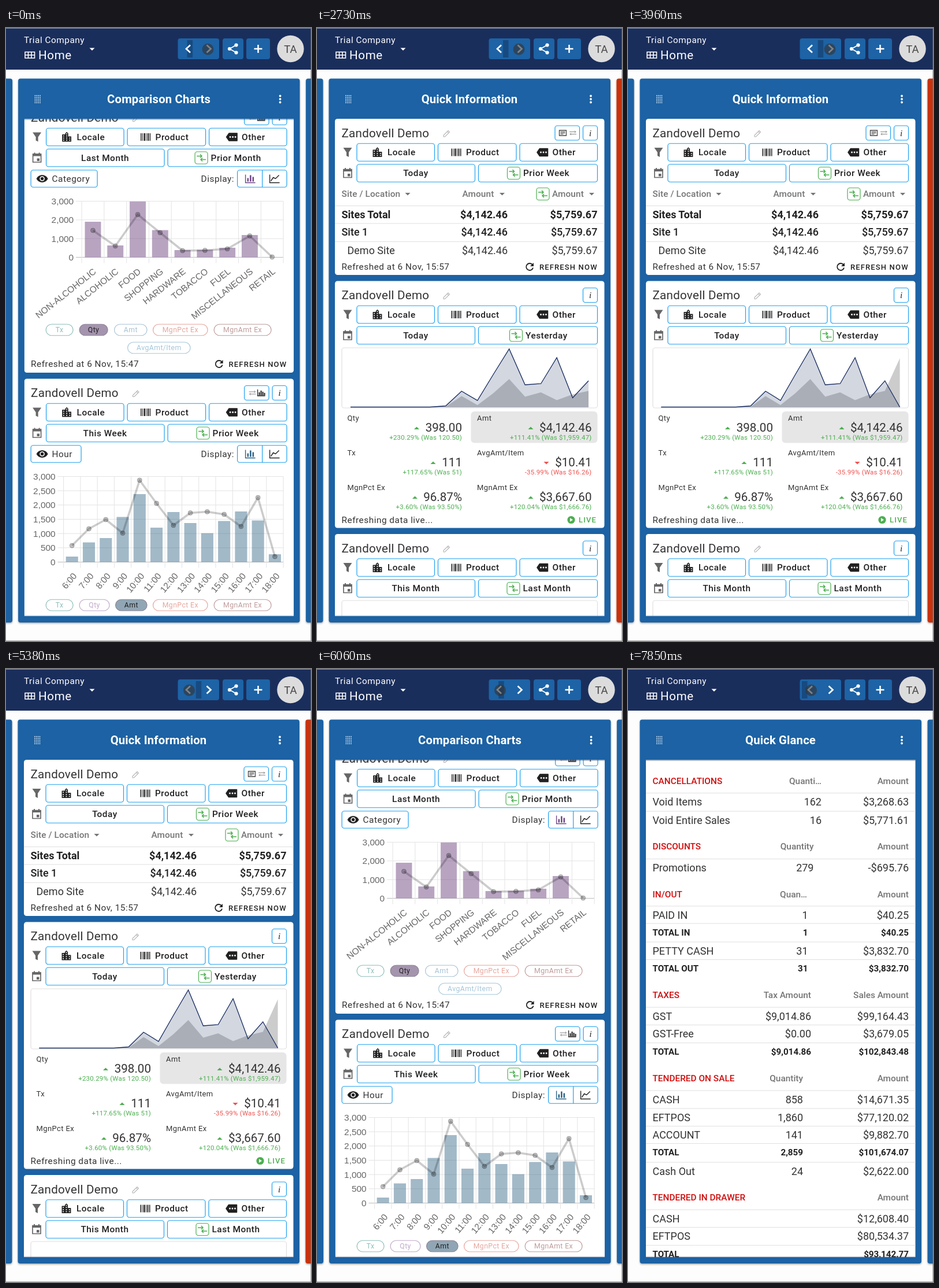
An HTML page that plays this animation: 528 px wide and 1060 px high, repeating every 8 s.

```html
<!DOCTYPE html>
<html lang="en">
<head>
<meta charset="utf-8">
<title>Dashboard</title>
<style>
  html, body { margin: 0; width: 100%; height: 100%; overflow: hidden; background: #fdfdfd; }
  svg { display: block; width: 100vw; height: 100vh; }
  text { font-family: Roboto, sans-serif; white-space: pre; }
  .axis text { font-family: "Liberation Sans", Arial, sans-serif; }
</style>
</head>
<body>
<svg id="stage" viewBox="0 0 528 1060"></svg>
<script>
const BLUE = '#1c62a4', INK = '#212121', GREY = '#757575', GREEN = '#4caf50', EDGE = '#1da1ee';

// Drawing helpers; the y of a text is the middle of its capitals.
const text = (x, y, s, { size = 15.4, ls = 0, w = 400, fill = INK, a = 'start', extra = '' } = {}) =>
  `<text x="${x}" y="${y + size * .355}" font-size="${size}" letter-spacing="${ls}" font-weight="${w}" fill="${fill}" text-anchor="${a}" ${extra}>${s}</text>`;
const rect = (x, y, w, h, fill, r = 0, extra = '') =>
  `<rect x="${x}" y="${y}" width="${w}" height="${h}" rx="${r}" fill="${fill}" ${extra}/>`;
const path = (d, fill = 'none', stroke = 'none', width = 1, extra = '') =>
  `<path d="${d}" fill="${fill}" stroke="${stroke}" stroke-width="${width}" ${extra}/>`;
const circle = (x, y, r, fill, extra = '') => `<circle cx="${x}" cy="${y}" r="${r}" fill="${fill}" ${extra}/>`;
const at = (x, y, body, more = '') => `<g transform="translate(${x} ${y}) ${more}">${body}</g>`;
const box = (x1, x2, y, h, stroke = EDGE, fill = '#fff', r = 4) =>
  rect(x1, y - h / 2, x2 - x1, h, fill, r, `stroke="${stroke}" stroke-width="1.2"`);
const rule = y => rect(31, y, 466.5, 1, '#e0e0e0');
const caret = (x, y, fill = GREY, dir = 1) => path(`M${x - 4.5} ${y - 2 * dir}h9l-4.5 ${4.5 * dir}z`, fill);
const label = { ls: .5, w: 500 };

const icons = {
  funnel: path('M-7.5-8H7.5L2 0V8L-2 6V0Z', '#666'),
  calendar: path('M-7-6.5H7V7.5H-7Z', 'none', '#666', 1.7) + path('M-7.5-7H7.5V-3H-7.5ZM-5-9h2v3h-2zM3-9h2v3h-2zM0 1h4.5v4.5H0z', '#666'),
  building: at(0, 0, path('M15 11V5l-3-3-3 3v2H3v14h18V11h-6zm-8 8H5v-2h2v2zm0-4H5v-2h2v2zm0-4H5V9h2v2zm6 8h-2v-2h2v2zm0-4h-2v-2h2v2zm0-4h-2V9h2v2zm0-4h-2V5h2v2zm6 12h-2v-2h2v2zm0-4h-2v-2h2v2z', INK), 'scale(.88) translate(-12 -12)'),
  barcode: path('M-8.5-6.5h1.5v13h-1.5zM-5.5-6.5h1v13h-1zM-3-6.5h2.5v13h-2.5zM1-6.5h1v13h-1zM3.5-6.5h2v13h-2zM7-6.5h1.5v13h-1.5z', INK),
  tag: path('M-9.5 0L-5-6.5H9V6.5H-5Z', INK, INK, 1.5, 'stroke-linejoin="round"') + [-3, 1.5, 6].map(x => circle(x, 0, 1.4, '#fff')).join(''),
  eye: path('M-10 0C-6-8.5 6-8.5 10 0C6 8.5-6 8.5-10 0Z', INK) + circle(0, 0, 4.3, '#fff') + circle(0, 0, 2.7, INK),
  pencil: path('M-5.5 5.5V3L2.5-5L5-2.5L-3 5.5ZM.8-3.3L3.3-.8', 'none', '#b4b4b4', 1.1),
  compare: box(-11, 11, 0, 21, GREEN) + path('M-8-3H1M-2-6L1-3L-2 0M8 3H-1M2 0L-1 3L2 6', 'none', GREEN, 1.5),
  refresh: path('M5-3.6A6 6 0 1 0 6 1.5', 'none', INK, 1.8) + path('M7-7V-1H1Z', INK),
  swap: path('M-6-2H5M3-4L5-2L3 0M6 2H-5M-3 0L-5 2L-3 4', 'none', '#888', 1),
  minibars: path('M-6-6V5H7', 'none', INK, 1.3) + path('M-4-1h2v5h-2zM-1-4h2v8h-2zM2-2h2v6h-2zM5 0h2v4h-2z', INK),
  article: path('M-6-4.5H6V4.5H-6Z', 'none', '#444', 1.3) + path('M-4-2H4M-4 0H4M-4 2H1', 'none', '#444', 1),
  trend: path('M-8-7V7H9', 'none', INK, 1.4) + path('M-6 4L-2-2L2 0L8-6', 'none', INK, 1.4)
};
const icon = (name, x, y) => at(x, y, icons[name]);

function cardHead(y, period, periodX, versus, versusX, corner) {
  let out = text(42.5, y, 'Zandovell Demo', { size: 20.6, ls: .25, fill: '#333' }) + icon('pencil', 224.5, y + 1) +
    box(460.5, 485.5, y, 25) +
    text(473, y, 'i', { size: 15, a: 'middle', extra: 'font-style="italic" style="font-family:Liberation Serif,serif"' });
  if (corner) out += box(412, 454.5, y, 25) + (corner === 'bars'
    ? icon('swap', 426, y) + icon('minibars', 441, y) : icon('article', 425.5, y) + icon('swap', 443, y));
  const f = y + 33.5, d = y + 69.5;
  out += icon('funnel', 53, f) + icon('calendar', 53, d);
  [[69, 203.5, 'building', 104.5, 'Locale', 122], [209.5, 345, 'barcode', 241, 'Product', 258], [351, 485.5, 'tag', 390.5, 'Other', 407.5]]
    .forEach(([x1, x2, name, ix, s, tx]) => out += box(x1, x2, f, 30.5) + icon(name, ix, f) + text(tx, f, s, label));
  return out + box(69, 273.5, d, 30.5) + text(periodX, d, period, { ...label, a: 'middle' }) +
    box(279.5, 485.5, d, 30.5) + icon('compare', versusX, d) + text(versusX + 16.5, d, versus, label);
}

const cardBack = (y1, y2) => rect(31, y1, 466.5, y2 - y1, '#fff', 4.5);
const refreshed = (y, time) => text(42.5, y, `Refreshed at 6 Nov, ${time}`, { ls: .5, fill: '#333' }) +
  icon('refresh', 368, y) + text(385, y, 'REFRESH NOW', { size: 13, ls: 1.15, w: 500 });

function displayRow(y, name, right, color) {
  return box(42.5, right, y, 29.5) + icon('eye', 62, y) + text(79, y, name, { ls: .5, fill: '#333' }) +
    text(337, y, 'Display:', { ls: .5, fill: '#333' }) + box(400, 485.5, y, 29.5) + rect(442.5, y - 14.5, 1.2, 29, EDGE) +
    path(`M414 ${y - 7}V${y + 7}H431`, 'none', color, 1.4) +
    path(`M417 ${y - 1}h2.5v6h-2.5zM421.5 ${y - 6}h2.5v11h-2.5zM426 ${y - 3}h2.5v8h-2.5z`, color) + icon('trend', 464, y);
}

function barChart({ left, top, bottom, ticks, names, bars, line, color, angle, dx, dy }) {
  const right = 479.5, step = (right - left) / names.length, mid = i => left + step * (i + .5);
  let out = '';
  ticks.forEach((s, i) => {
    const y = top + (bottom - top) * i / (ticks.length - 1);
    out += rect(left - 10, y - .5, right - left + 10, 1, i === ticks.length - 1 ? '#bbb' : '#e3e3e3') +
      text(left - 14, y, s, { fill: '#666', a: 'end' });
  });
  for (let i = 0; i <= names.length; i++) out += rect(left + step * i - .5, top, 1, bottom - top + 10, '#e3e3e3');
  names.forEach((s, i) => {
    const h = bottom - bars[i];
    out += rect(mid(i) - step * .36, bars[i], step * .72, h, color) +
      at(mid(i) + dx, bottom + dy, text(0, -5.5, s, { fill: '#666', a: 'end' }), `rotate(${-angle})`);
  });
  out += path('M' + line.map((y, i) => `${mid(i)} ${y}`).join('L'), 'none', 'rgba(0,0,0,.2)', 3.6, 'stroke-linejoin="round"');
  line.forEach((y, i) => out += circle(mid(i), y, 4, 'rgba(0,0,0,.24)', 'stroke="rgba(0,0,0,.24)"'));
  return `<g class="axis">${out}</g>`;
}

const chip = (x1, x2, y, s, color, fill) => box(x1, x2, y, 19.5, fill ? '#8b8496' : color, fill || '#fff', 10) +
  text((x1 + x2) / 2, y, s, { size: 12.3, ls: .4, a: 'middle', fill: fill ? INK : color });
const chips = (y, active, fill, qtyEnd, amtStart) => [
  [68.5, 115.5, 'Tx', '#8fbfb9'], [126.5, qtyEnd, 'Qty', '#bfa8cb'], [amtStart, 243.5, 'Amt', '#a8c2d5'],
  [254, 348.5, 'MgnPct Ex', '#e6a59d'], [359.5, 458.5, 'MgnAmt Ex', '#bf9a9a']
].map(([x1, x2, s, c]) => chip(x1, x2, y, s, c, s === active && fill)).join('');

const comparison = cardBack(120, 596) + cardHead(155, 'Last Month', 171, 'Prior Month', 337.5, 'bars') +
  displayRow(260.5, 'Category', 157.5, '#6d4585') +
  barChart({
    left: 130.5, top: 299.5, bottom: 396.5, ticks: ['3,000', '2,000', '1,000', '0'],
    names: ['NON-ALCOHOLIC', 'ALCOHOLIC', 'FOOD', 'SHOPPING', 'HARDWARE', 'TOBACCO', 'FUEL', 'MISCELLANEOUS', 'RETAIL'],
    bars: [335, 376, 300, 349.5, 384, 383.5, 380, 358, 396.5],
    line: [350, 377, 322.5, 354, 385, 384.5, 382, 359.5, 396],
    color: 'rgba(114,74,132,.5)', angle: 38.5, dx: 6.5, dy: 26.5
  }) + chips(522, 'Qty', '#a594ae', 175.5, 187) + chip(210, 318.5, 553, 'AvgAmt/Item', '#a5c6d9') + refreshed(581, '15:47') +
  cardBack(606.5, 1030) + cardHead(631, 'This Week', 171, 'Prior Week', 340.5, 'bars') +
  displayRow(736.5, 'Hour', 129.5, '#2a6288') +
  barChart({
    left: 99, top: 775.5, bottom: 923.5, ticks: ['3,000', '2,500', '2,000', '1,500', '1,000', '500', '0'],
    names: Array.from({ length: 13 }, (_, i) => `${i + 6}:00`),
    bars: [914, 889.5, 882, 845.5, 806, 864, 837, 856, 873.5, 852.5, 836, 851.5, 910],
    line: [895, 866, 850, 873.5, 782, 822, 860, 838.5, 836.5, 841, 862, 812, 914],
    color: 'rgba(70,117,146,.5)', angle: 50, dx: 9, dy: 24.5
  }) + chips(998, 'Amt', '#90a6b5', 178.5, 189);

const head = { fill: GREY, w: 500, ls: .1 };
function siteRow(y, x, name, w) {
  const style = { size: 18, w, fill: w > 400 ? INK : '#333' };
  return text(x, y, name, style) + text(330, y, '$4,142.46', { ...style, a: 'end' }) + text(485.5, y, '$5,759.67', { ...style, a: 'end' });
}
function stat(col, row, name, value, delta, arrowX, down) {
  const x = col ? 277 : 52.5, r = col ? 475.5 : 251, y = 674 + row * 60, color = down ? '#ef5350' : GREEN;
  return text(x, y, name, { size: 13, ls: .4, fill: '#333' }) + text(r, y + 17, value, { size: 20.6, a: 'end', fill: '#333' }) +
    text(r, y + 33.5, delta, { size: 11.5, ls: .2, a: 'end', fill: color }) + caret(arrowX, y + 18, color, down ? 1 : -1);
}

const info = cardBack(157, 427) + cardHead(181.5, 'Today', 171, 'Prior Week', 340.5, 'article') +
  text(42.5, 286.5, 'Site / Location', head) + caret(157, 287) + text(251.5, 286.5, 'Amount', head) + caret(320.5, 287) +
  icon('compare', 391, 287) + text(407, 286.5, 'Amount', head) + caret(475.5, 287) +
  rule(307) + siteRow(322.5, 42.5, 'Sites Total', 700) + rule(337.5) + siteRow(353, 42.5, 'Site 1', 500) + rule(369) +
  siteRow(385, 52.5, 'Demo Site', 400) + refreshed(413, '15:57') +
  cardBack(437.5, 864.5) + cardHead(462, 'Today', 171, 'Yesterday', 344.5) +
  box(43, 485.5, 605, 104, '#e0e0e0') + '<g id="area" clip-path="url(#plot)"></g>' +
  rect(266.5, 663, 219, 54.5, '#e6e6e6', 6) +
  stat(0, 0, 'Qty', '398.00', '+230.29% (Was 120.50)', 172.5) + stat(1, 0, 'Amt', '$4,142.46', '+111.41% (Was $1,959.47)', 370) +
  stat(0, 1, 'Tx', '111', '+117.65% (Was 51)', 201) + stat(1, 1, 'AvgAmt/Item', '$10.41', '-35.99% (Was $16.26)', 397, true) +
  stat(0, 2, 'MgnPct Ex', '96.87%', '+3.60% (Was 93.50%)', 169.5) + stat(1, 2, 'MgnAmt Ex', '$3,667.60', '+120.04% (Was $1,666.76)', 370) +
  text(42.5, 850.5, 'Refreshing data live...', { ls: .5, fill: '#333' }) +
  circle(440, 850.5, 6.6, GREEN) + path('M438 847.3v6.4l5-3.2z', '#fff') +
  text(453, 850.5, 'LIVE', { size: 13, ls: 1.15, w: 500, fill: GREEN }) +
  cardBack(875, 1030) + cardHead(899.5, 'This Month', 171, 'Last Month', 340) + box(43, 485.5, 1042, 104, '#e0e0e0');

// Each section: y, title, right edge of the middle column, its heading, last heading, then rows [y, name, middle, amount].
const sections = [
  [193.5, 'CANCELLATIONS', 335, 'Quanti…', 'Amount', [230, 'Void Items', '162', '$3,268.63'], [261.5, 'Void Entire Sales', '16', '$5,771.61']],
  [307, 'DISCOUNTS', 321.5, 'Quantity', 'Amount', [344, 'Promotions', '279', '-$695.76']],
  [389.5, 'IN/OUT', 311.5, 'Quan…', 'Amount', [425.5, 'PAID IN', '1', '$40.25'], [455.5, 'TOTAL IN', '1', '$40.25'],
    [487.5, 'PETTY CASH', '31', '$3,832.70'], [518, 'TOTAL OUT', '31', '$3,832.70']],
  [564, 'TAXES', 317, 'Tax Amount', 'Sales Amount', [600.5, 'GST', '$9,014.86', '$99,164.43'], [631, 'GST-Free', '$0.00', '$3,679.05'],
    [662, 'TOTAL', '$9,014.86', '$102,843.48']],
  [708, 'TENDERED ON SALE', 303, 'Quantity', 'Amount', [744.5, 'CASH', '858', '$14,671.35'], [775.5, 'EFTPOS', '1,860', '$77,120.02'],
    [806, 'ACCOUNT', '141', '$9,882.70'], [836, 'TOTAL', '2,859', '$101,674.07'], [868.5, 'Cash Out', '24', '$2,622.00']],
  [914, 'TENDERED IN DRAWER', 303, '', 'Amount', [950.5, 'CASH', '', '$12,608.40'], [981, 'EFTPOS', '', '$80,534.37'],
    [1012, 'TOTAL', '', '$93,142.77']]
];
const glance = rect(31, 157, 466.5, 870, '#fff') + sections.map(([y, title, mid, h1, h2, ...rows]) => {
  const grey = { w: 500, fill: GREY, a: 'end' };
  return text(42.5, y, title, { w: 500, fill: '#d00c0c' }) + text(h1 === 'Quan…' ? mid - 1.5 : mid, y, h1, grey) + text(486, y, h2, grey) +
    rows.map(([ry, name, m, amount]) => {
      const style = name.startsWith('TOTAL') ? { size: 15.2, w: 700 } : { size: 18, fill: '#333' };
      return rule(ry - 16) + text(42.5, ry, name, style) + text(mid, ry, m, { ...style, a: 'end' }) + text(486, ry, amount, { ...style, a: 'end' });
    }).join('');
}).join('');

function page(id, title, body, { shift = 0, left = true, next = BLUE, scrolled = true }) {
  const shadow = 'filter="url(#shadow)"';
  let dots = '';
  for (let i = 0; i < 20; i++) dots += rect(49 + i % 4 * 2.9, 116 + (i >> 2) * 3.1, 1.6, 1.6, '#dbe7f2');
  return `<g id="${id}" transform="translate(${shift} 0)" display="none">` +
    (left ? rect(-20, 87.5, 30.5, 940.5, BLUE, 4, shadow) : '') + rect(518.5, 87.5, 40, 940.5, next, 4, shadow) +
    rect(20.5, 87.5, 487.5, 940.5, BLUE, 4, shadow) + dots + [117.5, 123, 128.5].map(y => circle(474, y, 1.9, '#fff')).join('') +
    text(264, 123, title, { size: 20.3, ls: .15, w: 700, fill: '#fff', a: 'middle' }) +
    `<g clip-path="url(#scroll)">${body}</g>` +
    (scrolled ? rect(31, 157, 466.5, 2, 'rgba(40,70,110,.35)') : '') + rect(31, 1015.5, 466.5, 1.5, 'rgba(40,70,110,.25)') + '</g>';
}

const button = (x, w) => rect(x, 18, w, 36, '#1d63a5', 4);
const chevron = d => path(d, 'none', '#fff', 2.7);
const header = rect(0, 0, 528, 72, '#1a2e5c') + rect(0, 0, 528, 1, '#8a93a8') +
  text(31, 20.5, 'Trial Company', { ls: .5, fill: '#fff' }) +
  path('M33 41.5H49.5V52H33ZM33 46.7H49.5M38.5 41.5V52M44 41.5V52', 'none', '#fff', 1.6) +
  text(56, 46.5, 'Home', { size: 20.6, ls: .6, fill: '#fff' }) + caret(149, 36.5, '#fff') +
  button(297.5, 71.5) + rect(0, 21, 9.5, 30, '#174a80', 0, 'id="marker"') +
  chevron('M319 29.5L312 36L319 42.5') + chevron('M347.5 29.5L354.5 36L347.5 42.5') +
  button(375, 36) + path('M398.5 29.5L387 36L398.5 42.5', 'none', '#fff', 1.8) +
  circle(398.5, 29.5, 3.1, '#fff') + circle(387, 36, 3.1, '#fff') + circle(398.5, 42.5, 3.1, '#fff') +
  button(416, 41) + path('M436.5 29V43M429.5 36H443.5', 'none', '#fff', 2.5) +
  circle(492.5, 36, 23.2, '#dcdcdc') + text(492.5, 36.5, 'TA', { size: 18.5, a: 'middle', fill: '#444' }) +
  circle(0, 36.8, 10, '#333', 'id="cursor" opacity=".62"');

const stage = document.getElementById('stage');
stage.innerHTML = `<defs>
  <clipPath id="scroll">${rect(31, 157, 467, 860, '#000')}</clipPath>
  <clipPath id="plot">${rect(43, 553, 441.5, 104, '#000')}</clipPath>
  <filter id="shadow" x="-20%" y="-2%" width="140%" height="104%"><feDropShadow dx="0" dy="1.5" stdDeviation="1.5" flood-opacity=".35"/></filter>
  </defs>` + rect(0, 0, 528, 1060, '#fdfdfd') +
  page('comparison', 'Comparison Charts', comparison, { shift: .6 }) +
  page('info', 'Quick Information', info, { next: '#c9330c', scrolled: false }) +
  page('glance', 'Quick Glance', glance, { left: false }) + header +
  rect(527, 0, 1, 1060, 'rgba(120,120,120,.5)') + rect(0, 1059, 528, 1, '#aaa');

const byId = id => document.getElementById(id);
const hold = (t, steps) => steps.findLast(([start]) => start <= t)[1];

// Both series start flat; the last value joins when the chart updates.
const FLOOR = 655.5, flat = Array(6).fill(FLOOR);
const current = [...flat, 653.5, 628, 644, 599, 555, 617, 615, 570, 639.5, 610, FLOOR];
const previous = [...flat, 655, 636.5, 652, 631.5, 607, 637.5, 630, 643.5, 633.5, 627.5, 571];
const updates = [3150, 3270, 3390, 3540, 3690, 3840, 3960];

function drawArea(t) {
  const tick = updates.findLast(u => u <= t);
  const rest = tick ? (1 - (tick - 3100) / 1000) ** 4 : 1;
  const count = tick ? 17 : 16;
  const x = i => 57.3 + 25.83 * i + rest * (.7 + 1.64 * i);
  const trace = ys => 'M' + ys.slice(0, count)
    .map((y, i) => `${x(i)} ${i === 16 ? y + (FLOOR - y) * rest : y}`).join('L');
  const fill = (ys, color) => path(`${trace(ys)}L${x(count - 1)} 656L${x(0)} 656Z`, color);
  byId('area').innerHTML = fill(previous, 'rgba(0,0,0,.2)') + fill(current, 'rgba(24,42,90,.19)') +
    path(trace(current), 'none', '#172b60', 1.3);
}

function frame(now) {
  const t = now % 8000;
  const shown = hold(t, [[0, 'comparison'], [2730, 'info'], [5940, 'comparison'], [7730, 'glance']]);
  for (const id of ['comparison', 'info', 'glance']) byId(id).setAttribute('display', id === shown ? 'inline' : 'none');
  byId('marker').setAttribute('x', hold(t, [[0, 313.6], [120, 314.2], [2730, 322], [2880, 327], [3000, 328.7],
    [5940, 320], [6060, 314.2], [7730, 306], [7850, 301]]));
  byId('cursor').setAttribute('cx', hold(t, [[0, 349.5], [4780, 344], [4930, 331], [5080, 324], [5230, 319], [5380, 317]]));
  if (shown === 'info') drawArea(t);
  requestAnimationFrame(frame);
}
requestAnimationFrame(frame);
</script>
</body>
</html>
```
